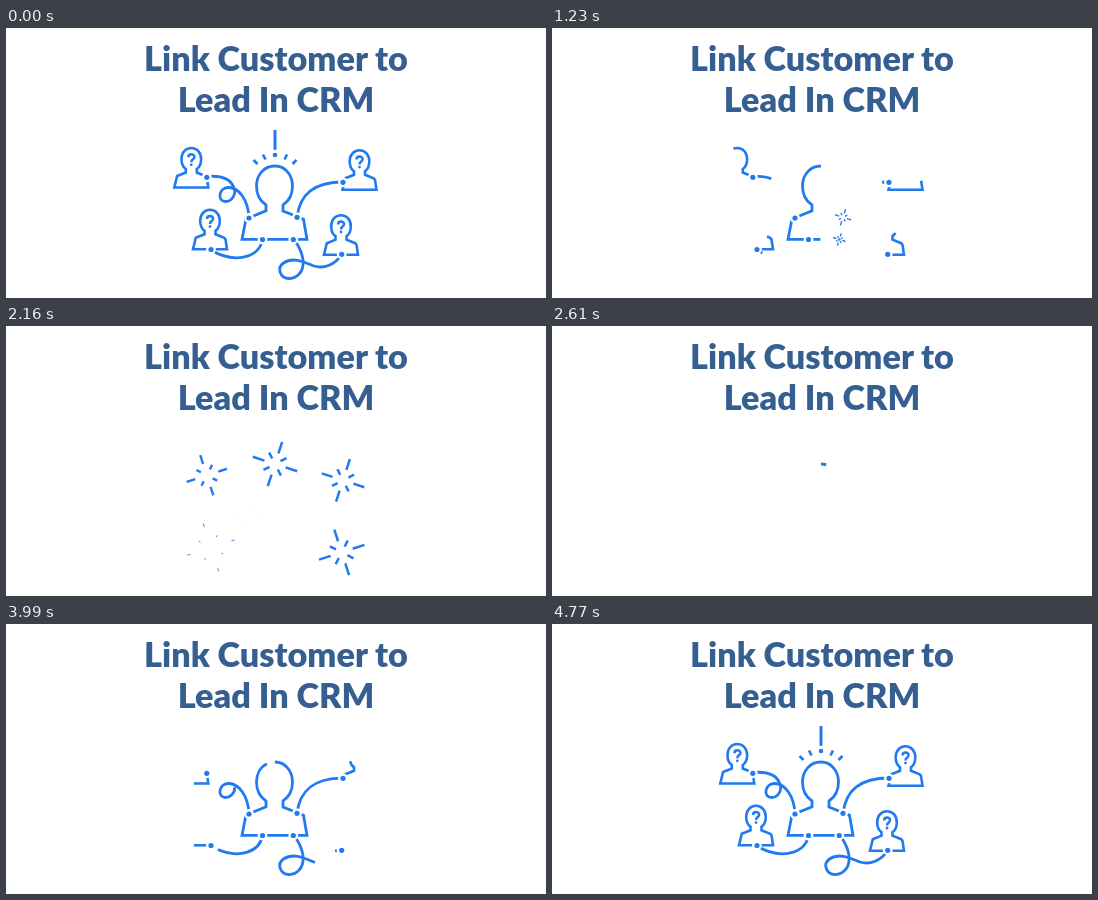
An HTML page with a canvas that plays this animation: 540x270 px, repeating every 4.8 s.

```html
<!DOCTYPE html>
<html lang="en">
<head>
<meta charset="utf-8">
<title>Link Customer to Lead In CRM</title>
<style>
  html, body { margin: 0; width: 100%; height: 100%; overflow: hidden; background: #fff; }
  canvas { position: absolute; left: 0; top: 0; width: 540px; height: 270px; }
  h1 {
    position: absolute; left: 0; top: 9px; width: 540px; margin: 0;
    font: 900 34.2px/41px Lato, sans-serif; color: #355f91; text-align: center;
  }
</style>
</head>
<body>
<canvas id="stage"></canvas>
<h1>Link Customer to<br>Lead In CRM</h1>
<script>
const LOOP = 4800, TURN = 2500, BLUE = '#217af0', TAU = Math.PI * 2;
const canvas = document.getElementById('stage');
const ctx = canvas.getContext('2d');
const ratio = window.devicePixelRatio || 1;
canvas.width = 540 * ratio;
canvas.height = 270 * ratio;

const span = (t, [a, b]) => Math.min(1, Math.max(0, (t - a) / (b - a)));
const settle = x => x + 0.4 * x * (1 - x);
const easeOut = x => 1 - (1 - x) ** 3.6;

function line(d, out, into, options = {}) {
  const probe = document.createElementNS('http://www.w3.org/2000/svg', 'path');
  probe.setAttribute('d', d);
  return { path: new Path2D(d), length: probe.getTotalLength(), out, into,
           x: 0, y: 0, width: 2.8, start: 0, ease: v => v, ...options };
}

// Bust outline, clockwise from the right shoulder, relative to the top of the head.
const bust = 'L17 39.5 H-17 L-14.2 28 L-5.5 24.5 V21 C-8.5 19 -9.8 15.5 -9.8 11 ' +
  'C-9.8 5 -6 0 0 0 C6 0 9.8 5 9.8 11 C9.8 15.5 8.5 19 5.5 21 V24.5 L14.2 28 L15.5 29.5 ';
const twice = 'M15.5 29.5 ' + bust + bust;
const mark = 'M-2.9 9.2 C-2.9 5.4 3.1 5.4 3.1 8.9 C3.1 11.4 0 11.2 0 14.2';

const people = [
  { x: 185.3, y: 120, start: 0, out: [600, 1550], into: [3870, 4560], ask: [100, 660], reply: [4380, 4660] },
  { x: 353.5, y: 122.3, start: 52, out: [600, 1600], into: [3890, 4470], ask: [40, 480], reply: [4350, 4640] },
  { x: 204, y: 181.8, start: 27, out: [520, 1450], into: [3920, 4530], ask: [160, 720], reply: [4400, 4680] },
  { x: 335, y: 187.2, start: 27, out: [580, 1560], into: [3965, 4560], ask: [400, 960], reply: [4430, 4720] }
];

const lines = [
  line('M269 138 C279 138 286.5 147 286.5 158 C286.5 166 283 173 277 177 V183 L297.5 191.3 ' +
       'L301 211.3 H236 L240 191 L260 182.7 V177 C254 173 250.5 166 250.5 158 C250.5 147 258 138 269 138',
       [650, 1815], [2590, 4070], { ease: settle }),
  line('M243 189.5 C242 172 233 159 222 159.5 C213 160 210.5 173 219.5 173.5 ' +
       'C226 173.5 231 166 227.5 159 C224 150 213 147.5 201 148.5', [650, 1350], [3470, 4230]),
  line('M291 189 C294 166 308 154 337 154', [650, 1300], [3310, 4020]),
  line('M256.5 211 C254 230 228 236 205 222', [620, 1300], [3370, 4080]),
  line('M287 211 C294 218 298 230 297 237 C296 246 289 251 283 250.5 C274 250 270.5 240 277.5 235 ' +
       'C288 228 300 235 308 238 C318 241 329 237 336 226', [600, 1250], [3320, 4310], { ease: settle }),
  line('M269 102 V121.8', [700, 1000], [4230, 4480], { width: 3 }),
  ...['M259.5 131.5 L257 126.5', 'M251.5 136 L247.5 132', 'M278.5 131.5 L281 126.5', 'M286.5 136 L290.5 132']
    .map((d, i) => line(d, [740 + i * 40, 940 + i * 40], [4400 + i * 40, 4560 + i * 40], { width: 2.7 })),
  ...people.map(p => {
    const body = line(twice, p.out, p.into, { ...p, width: 2.6 });
    body.length /= 2;
    return body;
  }),
  ...people.map(p => line(mark, p.ask, p.reply, { x: p.x, y: p.y, width: 2.5 }))
];

// Joints pop into a burst of the given size and later grow back.
const joints = [
  { x: 291, y: 189.3, pop: 900, grow: 2900, size: 10 },
  { x: 287.3, y: 211.5, pop: 1030, grow: 3050, size: 10 },
  { x: 256.5, y: 211.5, pop: 1290, grow: 3180, size: 20 },
  { x: 205, y: 221.5, pop: 1450, grow: 3580, size: 25, tilt: -1 },
  { x: 243, y: 190, pop: 1400, grow: 3340, size: 11 },
  { x: 200.8, y: 149.3, pop: 1680, grow: 3520, size: 22, tilt: -1 },
  { x: 337, y: 154.3, pop: 1790, grow: 3000, size: 25 },
  { x: 335.7, y: 226.3, pop: 1800, grow: 3350, size: 27, tilt: -1 }
];
const crown = { x: 269, y: 138, pop: 1820, size: 27 };

function disc(x, y, r, color = BLUE) {
  if (r <= 0) return;
  ctx.fillStyle = color;
  ctx.beginPath();
  ctx.arc(x, y, r, 0, TAU);
  ctx.fill();
}

function drawLine(l, t) {
  const from = t < TURN ? span(t, l.out) : 0;
  const to = t < TURN ? 1 : l.ease(span(t, l.into));
  if (to - from < 0.001) return;
  ctx.save();
  ctx.translate(l.x, l.y);
  ctx.lineWidth = l.width;
  ctx.setLineDash([(to - from) * l.length, l.length * 3]);
  ctx.lineDashOffset = -(l.start + from * l.length);
  ctx.stroke(l.path);
  ctx.restore();
}

const present = (t, gone, back) => t < TURN ? 1 - span(t, gone) : span(t, back);

// Rays shoot out from the centre, then their tails catch up with their tips.
function drawBurst({ x, y, pop, size, tilt = 1 }, t) {
  const p = span(t, [pop, pop + 800]);
  if (p <= 0 || p >= 1) return;
  const tip = size * easeOut(p);
  const tail = Math.min(tip, size * (0.25 + 0.75 * p ** 1.8));
  const minor = 0.55 + 0.45 * (1 - p) ** 8;
  ctx.lineWidth = Math.min(2.5, 0.5 + size * 0.085) * Math.min(1, 3 * (1 - p));
  ctx.beginPath();
  for (let i = 0; i < 8; i++) {
    const angle = tilt * Math.PI / 10 + i * TAU / 8;
    const reach = i % 2 ? minor : 1;
    ctx.moveTo(x + Math.cos(angle) * tail * reach, y + Math.sin(angle) * tail * reach);
    ctx.lineTo(x + Math.cos(angle) * tip * reach, y + Math.sin(angle) * tip * reach);
  }
  ctx.stroke();
}

function draw(t) {
  ctx.setTransform(ratio, 0, 0, ratio, 0, 0);
  ctx.clearRect(0, 0, 540, 270);
  ctx.strokeStyle = BLUE;
  lines.forEach(l => drawLine(l, t));
  joints.forEach(j => disc(j.x, j.y, 4.9, '#fff'));
  joints.forEach(j => disc(j.x, j.y,
    2.6 * present(t, [j.pop + 90, j.pop + 300], [j.grow, j.grow + 150])));
  people.forEach(p => disc(p.x, p.y + 16.8,
    1.4 * present(t, [p.ask[1] + 50, p.ask[1] + 180], [p.reply[1] - 40, p.reply[1] + 30])));
  disc(269, 127, 2.3 * present(t, [880, 1040], [4400, 4520]));
  [...joints, crown].forEach(j => drawBurst(j, t));
}

const began = performance.now();
function tick() {
  draw((performance.now() - began) % LOOP);
  requestAnimationFrame(tick);
}
tick();
</script>
</body>
</html>
```
